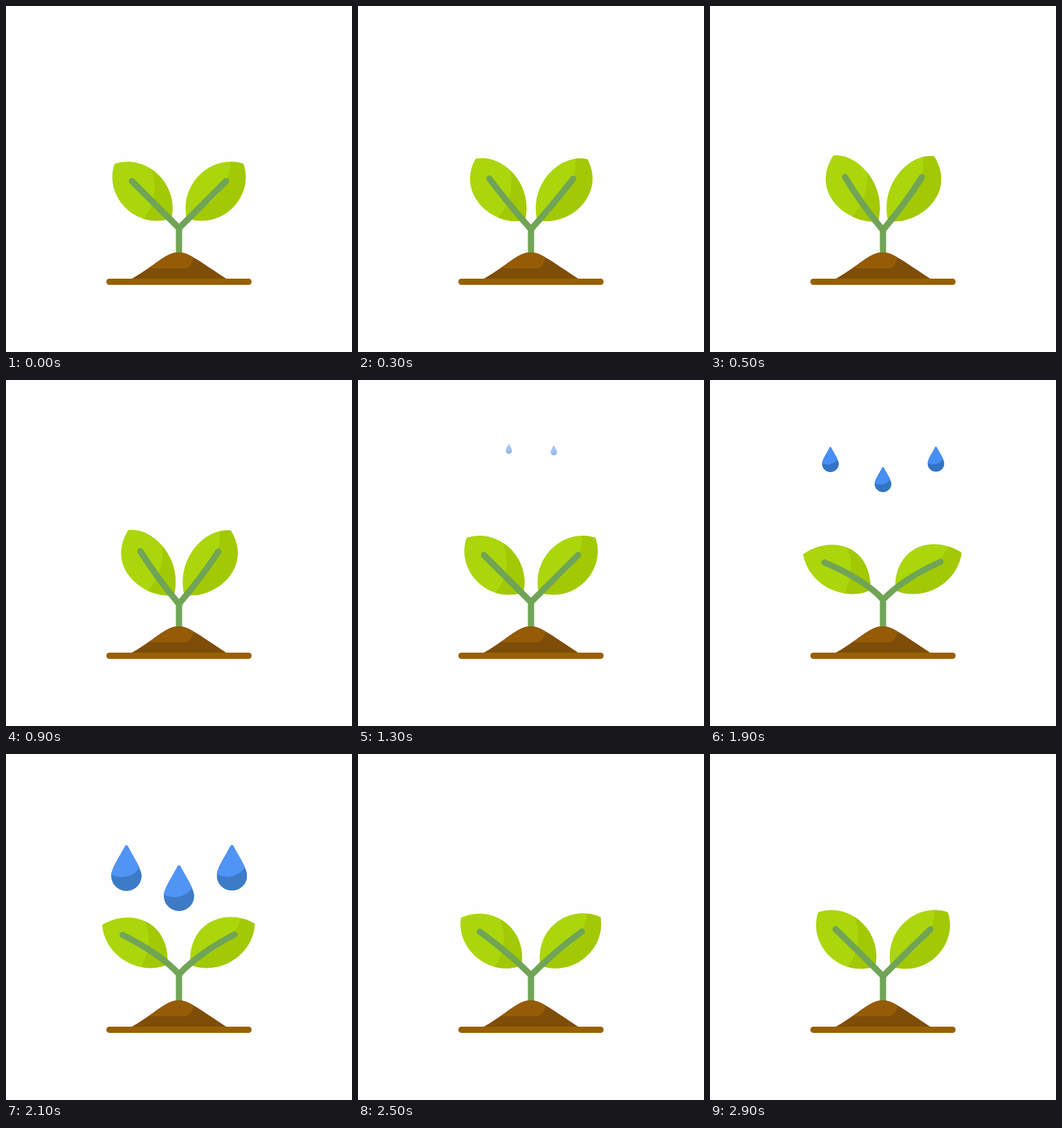
Write an HTML page that moves like this. It is 500 by 500 pixels and loops after 3000 ms.

```html
<!DOCTYPE html>
<html lang="en">
<head>
<meta charset="utf-8">
<title>Seedling</title>
<style>
html, body { margin: 0; width: 100%; height: 100%; overflow: hidden; background: #fefefe; }
svg { display: block; width: 100vw; height: 100vh; }
.vein { fill: none; stroke: #70a456; stroke-width: 9; stroke-linecap: round; stroke-linejoin: round; }
.light { fill: #abd60b; }
.dark { fill: #a2c904; }
</style>
</head>
<body>
<svg viewBox="0 0 500 500">
  <defs>
    <clipPath id="moundClip"><path d="M181 394.500C205 381 222 366 235 359.500Q250 352.500 265 360C280 368 298 381 319 394.500Z"/></clipPath>
    <clipPath id="dropClip"><path d="M-2-32Q0-34 2-32C7-21 22 0 22 11A22 22 0 0 1-22 11C-22 0-7-21-2-32Z"/></clipPath>
    <clipPath id="clip0"><path id="clipLeaf0"/></clipPath>
    <clipPath id="clip1"><path id="clipLeaf1"/></clipPath>
    <g id="drop" clip-path="url(#dropClip)">
      <rect x="-24" y="-36" width="48" height="72" fill="#3374c5"/>
      <circle cx="-7" cy="-19" r="32" fill="#478ff6"/>
    </g>
  </defs>
  <g id="plant">
    <g>
      <path id="leaf0" class="light"/>
      <path id="shade0" class="dark" clip-path="url(#clip0)"/>
    </g>
    <g transform="translate(500) scale(-1 1)">
      <path id="leaf1" class="light"/>
      <path id="shade1" class="dark" clip-path="url(#clip1)"/>
    </g>
    <path id="vein0" class="vein"/>
    <path id="vein1" class="vein" transform="translate(500) scale(-1 1)"/>
    <path class="vein" d="M250 321V362"/>
  </g>
  <g clip-path="url(#moundClip)">
    <rect x="175" y="350" width="150" height="45" fill="#7e4d07"/>
    <path d="M190 379H258Q274 377 270 350H190Z" fill="#955b07"/>
  </g>
  <rect x="145" y="394" width="210" height="9" rx="4.500" fill="#986005"/>
  <g id="rain"></g>
</svg>
<script>
const LOOP = 3000, STEP = 100;
const $ = id => document.getElementById(id);

// Each shape has three poses: rest, raised, lowered.
const leaf = [
  [157,228, 202,213, 250,256, 239,307, 184,324, 141,272],
  [178,216, 213,212, 256,258, 243,311, 203,317, 142,273],
  [138,248, 178,222, 236,240, 233,304, 195,321, 143,295]
];
const vein = [
  [182,253, 216,287, 250,321],
  [195,247, 217,284, 250,324],
  [168,262, 222,288, 250,318]
];
const shades = [
  [[208,233, 220,258, 216,288, 198,308],
   [226,235, 230,262, 222,290, 202,307],
   [197,237, 210,258, 208,285, 194,309]],
  [[176,224, 176,262, 200,288, 238,304],
   [194,213, 188,250, 210,285, 242,304],
   [157,237, 167,268, 200,290, 234,300]]
];
const closing = ['L270 340V200Z', 'V340H100V200Z'];
const REACH = { up: 0.71, down: 0.84 };

// Bend over time: negative raises the leaves, positive lowers them.
const bendKeys = [0,0, 700,-1, 1300,0, 1700,.84, 1800,.95, 1900,1, 2100,.8, 2500,.36, 2900,.03, 3000,0];

const falls = [
  { start: 1300, end: 1900,
    y: [0,100, 100,123, 200,154, 300,184, 400,208, 500,223, 600,230],
    size: [0,.21, 100,.55, 200,.88, 300,1, 400,.93, 600,0],
    alpha: [0,.5, 100,1, 400,1, 600,0] },
  { start: 1800, end: 2500,
    y: [0,90, 100,115, 200,143, 300,165, 400,170, 600,172],
    size: [0,.21, 100,.55, 200,.9, 300,1, 600,.93],
    alpha: [0,.5, 100,1, 200,1, 300,.95, 700,0] }
];
const drops = [
  { x: 218, dy: 0, fall: falls[0] },
  { x: 283, dy: 2, fall: falls[0] },
  { x: 174, dy: 0, fall: falls[1] },
  { x: 250, dy: 29, fall: falls[1] },
  { x: 326.5, dy: -.5, fall: falls[1] }
];

for (const d of drops) {
  d.el = document.createElementNS('http://www.w3.org/2000/svg', 'use');
  d.el.setAttribute('href', '#drop');
  $('rain').append(d.el);
}

function track(keys, t) {
  if (t <= keys[0]) return keys[1];
  for (let i = 2; i < keys.length; i += 2) {
    if (t <= keys[i]) {
      const f = (t - keys[i - 2]) / (keys[i] - keys[i - 2]);
      return keys[i - 1] + (keys[i + 1] - keys[i - 1]) * f;
    }
  }
  return keys[keys.length - 1];
}

function pose([rest, up, down], k) {
  const to = k < 0 ? up : down;
  const f = k < 0 ? -k / REACH.up : k / REACH.down;
  return rest.map((v, i) => +(v + (to[i] - v) * f).toFixed(2));
}

const setPath = (id, d) => $(id).setAttribute('d', d);

function drawLeaf(side, k) {
  const p = pose(leaf, k);
  const outline = `M${p.slice(0, 2)}C${p.slice(2, 8)}C${p.slice(8)},${p.slice(0, 2)}Z`;
  setPath('leaf' + side, outline);
  setPath('clipLeaf' + side, outline);
  const s = pose(shades[side], k);
  setPath('shade' + side, `M${s.slice(0, 2)}C${s.slice(2)}${closing[side]}`);
  const v = pose(vein, k);
  setPath('vein' + side, `M${v.slice(0, 2)}Q${v.slice(2)}`);
}

function drawDrop({ el, x, dy, fall }, t) {
  const on = t >= fall.start && t < fall.end;
  el.style.display = on ? '' : 'none';
  if (!on) return;
  const age = t - fall.start;
  el.setAttribute('transform', `translate(${x} ${track(fall.y, age) + dy}) scale(${track(fall.size, age)})`);
  el.setAttribute('opacity', track(fall.alpha, age));
}

function render(now) {
  const t = Math.floor((now % LOOP) / STEP) * STEP;
  const bend = track(bendKeys, t);
  drawLeaf(0, bend);
  drawLeaf(1, bend * .91);
  drops.forEach(d => drawDrop(d, t));
}

const begin = performance.now();
function tick() {
  render(performance.now() - begin);
  requestAnimationFrame(tick);
}
tick();
</script>
</body>
</html>
```
